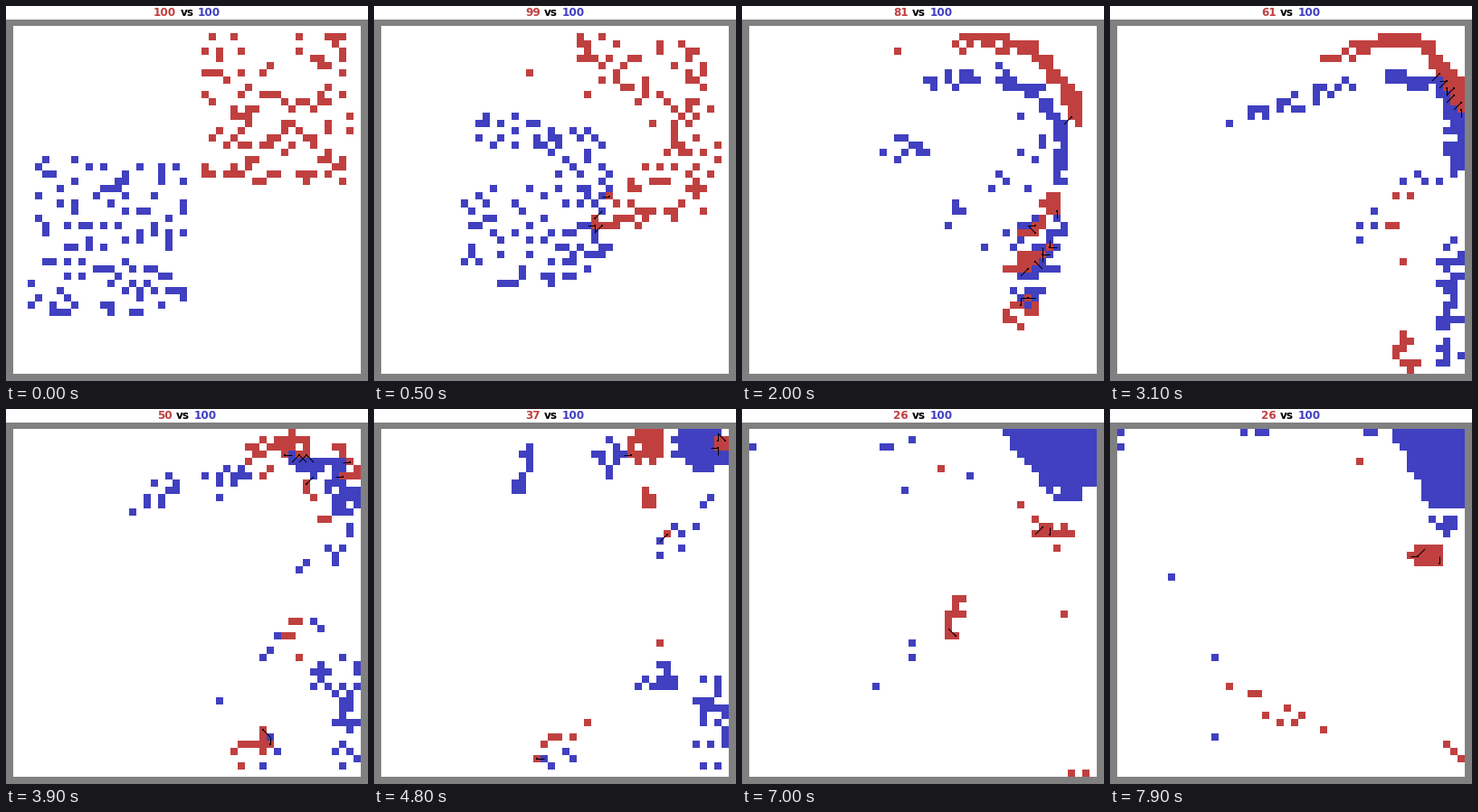
A matplotlib script for the animation above (8 s loop, 400x415 px).

```python
import numpy as np
import matplotlib.pyplot as plt
from matplotlib.animation import FuncAnimation
from matplotlib.collections import LineCollection
from matplotlib.offsetbox import AnnotationBbox, HPacker, TextArea
from matplotlib.patches import Rectangle

W, H, DPI = 400, 415, 100
CELL, N, X0, Y0 = 8, 48, 8, 23
FRAMES, STEP = 80, 100
PX = 72 / DPI
RED, BLUE, GRAY = "#c04040", "#4040c0", "#808080"
PALETTE = np.array([(255, 255, 255), (192, 64, 64), (64, 64, 192)], np.uint8)

rng = np.random.default_rng(7)
RING = [(i, j) for i in (-1, 0, 1) for j in (-1, 0, 1) if i or j]
NEAR = sorted(((i, j) for i in range(-5, 6) for j in range(-5, 6)),
              key=lambda d: (max(map(abs, d)), abs(d[0]) + abs(d[1])))


# Formations: (number of fighters, place of the k-th one)

def dots(*cells):
    return len(cells), lambda k: np.array(cells[k], float)


def line(n, spread, c0, r0, c1, r1):
    a, b = np.array((c0, r0)), np.array((c1, r1))
    return n, lambda k: a + (b - a) * (k + .5) / n + rng.uniform(-spread, spread, 2)


def blob(n, c, r, rc, rr):
    def place(k):
        a, d = rng.uniform(0, 2 * np.pi), np.sqrt(rng.uniform())
        return np.array((c + rc * d * np.cos(a), r + rr * d * np.sin(a)))
    return n, place


def arc(n, spread, c, r, radius, a0, a1):
    def place(k):
        a = np.radians(a0 + (a1 - a0) * (k + .5) / n)
        d = radius + rng.uniform(-spread, spread)
        return np.array((c + d * np.cos(a), r + d * np.sin(a)))
    return n, place


def wedge(c, slope, rows):
    """Solid mass in the top right corner behind a slanted edge."""
    return dots(*((i, r) for r in range(rows) for i in range(round(c + slope * r), N)))


def muster(groups, taken):
    cells = []
    for n, place in groups:
        for k in range(n):
            slack = 0
            while True:
                p = place(k) + rng.uniform(-slack, slack, 2)
                cell = tuple(int(v) for v in np.clip(np.rint(p), 0, N - 1))
                if cell not in taken:
                    break
                slack += .02
            taken.add(cell)
            cells.append(cell)
    return np.array(cells, float)


def square(c, r, size, n):
    k = rng.choice(size * size, n, replace=False)
    return np.c_[c + k % size, r + k // size].astype(float)


keys = [(0, square(26, 1, 21, 100), square(2, 18, 22, 100))]


def pose(t, reds, blues):
    taken = set()
    keys.append((t, muster(reds, taken), muster(blues, taken)))


pose(11,
     [dots((13, 3)), arc(97, 1.2, 26, 18.5, 18, -86, 72)],
     [arc(66, .9, 26, 18.5, 13.7, -95, 65), blob(14, 22.5, 21.5, 1.6, 4),
      blob(20, 32, 22, 5, 9)])
pose(31,
     [line(12, .8, 28, 4, 36, 2), line(14, .8, 36, 1.5, 43, 2), line(20, 1, 43, 3, 47, 10),
      blob(10, 39.5, 44.5, 2, 2.5), line(5, 1.5, 37, 32, 40, 20)],
     [line(20, 1.2, 16, 13, 32, 7), line(16, 1, 36, 6, 45, 8), line(24, 1.2, 46, 9, 46, 19),
      line(4, .5, 33, 29, 35, 25), line(4, .5, 38, 20, 45, 21),
      line(32, 1.5, 46, 29, 45, 46)])
pose(48,
     [blob(20, 36, 1.5, 2.6, 2.5), blob(5, 36.5, 8.5, 1, 2), line(6, .7, 20, 45, 28, 40),
      blob(4, 46, 1, 1.5, 1), dots((39, 14), (38, 29))],
     [blob(34, 44, 2, 3.2, 2.3), blob(10, 31, 3, 2, 3), line(10, 1, 20, 2, 19, 8),
      line(8, 1, 37, 18, 46, 9), blob(12, 38, 34, 3, 2), blob(22, 45, 40, 2.2, 7),
      blob(4, 24, 45, 2, 1)])
pose(61,
     [blob(15, 33, 8, 2.4, 3), line(6, .5, 34, 13, 36, 16),
      dots((38, 16), (39, 16), (36, 28), (29, 35), (43, 43), (46, 47))],
     [wedge(41, .6, 7), line(14, .9, 22, .5, 39, 1), blob(26, 39, 7, 2.4, 3.6),
      line(16, .8, 46, 7, 45, 20),
      dots((6, 0), (45, 23), (47, 25), (47, 27), (34, 22), (27, 24), (29, 30), (29, 31))])
pose(70,
     [dots((26, 5), (37, 10), (43, 25), (44, 47), (46, 47)),
      line(11, 1.2, 39, 12, 43, 15), line(10, .9, 29, 22, 27, 28)],
     [wedge(35, .75, 8),
      dots((0, 2), (18, 2), (19, 2), (22, 1), (30, 6), (21, 8), (22, 29), (22, 31),
           (17, 35)),
      blob(8, 43.5, 8.5, 2.2, .7)])
pose(79,
     [dots((33, 4)), blob(13, 42, 17, 2.4, 1.4), line(9, 1.5, 15, 36, 28, 41),
      line(3, 0, 45, 43, 47, 45)],
     [wedge(38, .5, 11),
      dots((0, 0), (0, 2), (17, 0), (19, 0), (20, 0), (34, 0), (35, 0), (7, 20),
           (13, 31), (13, 42)),
      blob(7, 45, 12.3, 2, 1.5)])


def match(a, b):
    """Pair cells of a with b by swaps; indices past len(b) mean a loss."""
    n, m = len(a), len(b)
    cost = np.zeros((n, n))
    cost[:, :m] = ((a[:, None] - b[None]) ** 2).sum(-1)
    cost = cost.tolist()
    to = list(range(n))
    better = True
    while better:
        better = False
        for i in range(n):
            for j in range(i):
                p, q = to[i], to[j]
                if cost[i][q] + cost[j][p] < cost[i][p] + cost[j][q] - 1e-9:
                    to[i], to[j] = q, p
                    better = True
    return to


def route(a, b):
    """Start, goal and order of loss (-1 for survivors) of each fighter."""
    goal, loss, lost = a.copy(), np.full(len(a), -1), 0
    for i, k in enumerate(match(a, b)):
        if k < len(b):
            goal[i] = b[k]
        else:
            goal[i] = b[((b - a[i]) ** 2).sum(1).argmin()]
            loss[i], lost = lost, lost + 1
    return a, goal, loss


def march(path, k):
    start, goal, loss = path
    alive = (loss < 0) | (loss >= round(k * (loss.max() + 1)))
    return (start + (goal - start) * k)[alive]


def settle(cells, taken):
    """Round to the grid, one fighter per cell."""
    out = []
    for c, r in np.rint(cells).astype(int).tolist():
        for i, j in NEAR:
            p = (c + i, r + j)
            if p not in taken and 0 <= p[0] < N and 0 <= p[1] < N:
                break
        taken.add(p)
        out.append(p)
    return out


def clashes(reds, blues):
    """Some neighbouring foes, or a scuffle when the armies are apart."""
    def pairs(foes):
        return [(c, r, i, j) for c, r in reds for i, j in RING if (c + i, r + j) in foes]

    found = pairs(set(blues))
    count = 4 + len(found) // 5
    if len(found) < 2:
        found, count = pairs(set(reds)), 3
    return [found[k] for k in rng.permutation(len(found))[:count]]


def scene(t):
    i = next((i for i in range(len(keys) - 1) if t < keys[i + 1][0]), len(keys) - 2)
    t0, t1 = keys[i][0], keys[i + 1][0]
    taken = set()
    reds, blues = (settle(march(p, (t - t0) / (t1 - t0)), taken) for p in routes[i])
    return reds, blues, clashes(reds, blues) if t else []


routes = [(route(a[1], b[1]), route(a[2], b[2])) for a, b in zip(keys, keys[1:])]
scenes = [scene(t) for t in range(FRAMES)]

fig = plt.figure(figsize=(W / DPI, H / DPI), dpi=DPI, facecolor="white")
ax = fig.add_axes([0, 0, 1, 1])
ax.axis("off")
ax.add_patch(Rectangle((0, Y0 - CELL), W, H - Y0 + CELL, color=GRAY, lw=0))
field = ax.imshow(np.full((N, N, 3), 255, np.uint8), interpolation="nearest", aspect="auto",
                  extent=(X0, X0 + N * CELL, Y0 + N * CELL, Y0), zorder=2)
ax.set(xlim=(0, W), ylim=(H, 0))
blows = LineCollection([], colors="black", linewidths=PX, zorder=3)
ax.add_collection(blows)
tips, = ax.plot([], [], "s", color="black", ms=2.4 * PX, mew=0, zorder=4)


def label(text, color):
    return TextArea(text, textprops=dict(color=color, family="DejaVu Sans",
                                         weight="bold", size=12 * PX))


score = [label("100", RED), label("vs", "black"), label("100", BLUE)]
title = HPacker(children=score, align="baseline", pad=0, sep=4.2 * PX)
ax.add_artist(AnnotationBbox(title, (W / 2, 7.5), frameon=False, pad=0))


def draw(t):
    reds, blues, hits = scenes[t]
    grid = np.zeros((N, N), int)
    for team, cells in enumerate((reds, blues), 1):
        c, r = np.array(cells).T
        grid[r, c] = team
    field.set_data(PALETTE[grid])
    h = np.array(hits, float).reshape(-1, 4)
    tip = h[:, :2] * CELL + (X0 + CELL / 2, Y0 + CELL / 2)
    blows.set_segments(np.stack([tip, tip + h[:, 2:] * CELL], axis=1))
    tips.set_data(tip[:, 0], tip[:, 1])
    score[0].set_text(str(len(reds)))
    score[2].set_text(str(len(blues)))
    return field, blows, tips


anim = FuncAnimation(fig, draw, frames=FRAMES, interval=STEP, repeat=True, repeat_delay=0,
                     blit=False)
plt.show()
```
